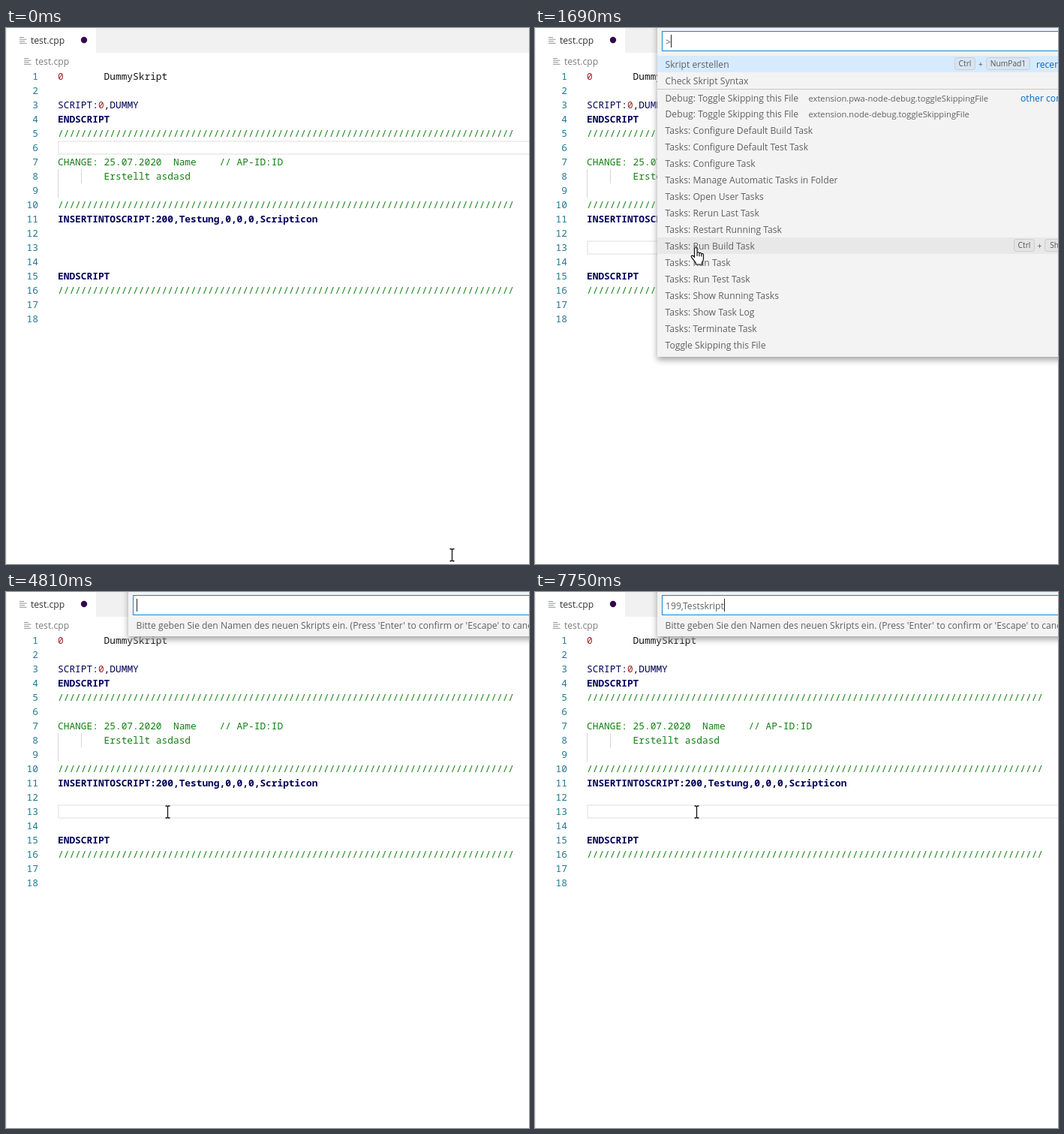
An HTML page for the animation above (8 s loop, 697 px wide and 714 px high).

```html
<!DOCTYPE html>
<html lang="de">
<head>
<meta charset="utf-8">
<title>Editor</title>
<style>
  html, body { margin: 0; width: 100%; height: 100%; overflow: hidden; background: #fff; }
  svg { display: block; width: 697px; height: 714px; }
  text { white-space: pre; font: 12.17px "Open Sans", sans-serif; fill: #616161; }
  .code text { font: 12.83px "Noto Sans Mono", monospace; }
  .code .b { font-weight: 700; }
  .num { fill: #237893; text-anchor: end; }
  .hit { fill: #0060b4; font-weight: 700; }
  .note { fill: #0066bf; }
  text.small { font-size: 11.2px; }
  text.key { font-size: 10.2px; fill: #555; text-anchor: middle; }
  .panel { fill: #f3f3f3; filter: drop-shadow(0 4px 4px #a0a0a0); }
</style>
</head>
<body>
<svg viewBox="0 0 697 714">
  <rect width="697" height="714" fill="#fff"/>
  <rect width="1" height="714" fill="#ebebeb"/>
  <rect x="120" width="577" height="33" fill="#f1f1f1"/>
  <g id="tabs"></g>
  <g id="guides" fill="#d6d6d6"></g>
  <rect id="active" x="70" width="640" height="17" fill="none" stroke="#eee" stroke-width="2"/>
  <g id="code" class="code"></g>
  <rect id="editCaret" x="99.5" y="283" width="1.5" height="19" fill="#111"/>
  <g id="palette"></g>
  <g id="beam" fill="none">
    <path d="M-3 -8H-1L0 -7L1 -8H3M0 -7V7M-3 8H-1L0 7L1 8H3" stroke="#fff" stroke-width="3"/>
    <path d="M-3 -8H-1L0 -7L1 -8H3M0 -7V7M-3 8H-1L0 7L1 8H3" stroke="#111" stroke-width="1.3"/>
  </g>
  <path id="hand" fill="#fff" stroke="#111" stroke-width="1.2" stroke-linejoin="round"
    d="M212.5 306V294.3Q212.5 292.5 214.3 292.5T216.1 294.3V299.4Q217.8 297.8 219 300Q220.8 298.6 221.8 300.8Q224.5 300 224.5 302.6V307.5Q224.5 310 222.6 312V315H214.3V312.8L208.6 305.4Q207.6 303.6 209.3 303.2Q210.8 303 212.5 305M216.1 299.4V304M219 300V304.2M221.8 300.8V304.6"/>
</svg>
<script>
const LOOP = 8000;
const $ = id => document.getElementById(id);
const esc = s => s.replace(/&/g, "&amp;").replace(/</g, "&lt;").replace(/>/g, "&gt;");
const text = (x, y, s, attrs = "") => `<text x="${x}" y="${y}" ${attrs}>${s}</text>`;
const rect = (x, y, w, h, attrs) => `<rect x="${x}" y="${y}" width="${w}" height="${h}" ${attrs}/>`;
const show = (el, on) => el.setAttribute("display", on ? "inline" : "none");

// Editor content: colour and text runs per line
const NAVY = "#000058", RED = "#a02020", GREEN = "#128012";
const rule = [[GREEN, "/".repeat(79)]];
const end = [[NAVY, "ENDSCRIPT", "b"]];
const lines = [
  [[RED, "0"], ["#111", "       DummySkript"]],
  [],
  [[NAVY, "SCRIPT:"], [RED, "0"], [NAVY, ",DUMMY"]],
  end,
  rule,
  [],
  [[GREEN, "CHANGE: 25.07.2020  Name    // AP-ID:ID"]],
  [[GREEN, "        Erstellt asdasd"]],
  [],
  rule,
  [[NAVY, "INSERTINTOSCRIPT:200,Testung,0,0,0,Scripticon", "b"]],
  [], [], [],
  end,
  rule,
  [], []
];
const lineTop = n => 55 + 19 * (n - 1);

$("code").innerHTML = lines.map((runs, i) => {
  const y = lineTop(i + 1) + 14;
  const spans = runs.map(([fill, s, cls = ""]) => `<tspan fill="${fill}" class="${cls}">${s}</tspan>`).join("");
  return text(43, y, i + 1, 'class="num"') + text(69, y, spans);
}).join("");

$("guides").innerHTML = [[69, 8], [100, 8], [69, 9]]
  .map(([x, n]) => rect(x, lineTop(n), 1, 19, "")).join("");

const fileIcon = (x, y) => [6, 9.5, 7, 9.5]
  .map((w, i) => rect(x, y + i * 2.6, w, 1.1, 'fill="#9a9fa3"')).join("");
$("tabs").innerHTML = fileIcon(18, 12) + text(33, 21, "test.cpp", 'style="fill:#333"') +
  '<circle cx="104" cy="16" r="4.2" fill="#34084f"/>' +
  fileIcon(24, 40) + text(39, 49, "test.cpp", 'style="fill:#7c7c7c"');

// Command palette
const commands = [
  "Skript erstellen", "Check Skript Syntax",
  "Debug: Toggle Skipping this File", "Debug: Toggle Skipping this File",
  ...["Configure Default Build Task", "Configure Default Test Task", "Configure Task",
    "Manage Automatic Tasks in Folder", "Open User Tasks", "Rerun Last Task",
    "Restart Running Task", "Run Build Task", "Run Task", "Run Test Task",
    "Show Running Tasks", "Show Task Log", "Terminate Task"].map(s => "Tasks: " + s),
  "Toggle Skipping this File"
];
const details = { 2: "extension.pwa-node-debug.toggleSkippingFile", 3: "extension.node-debug.toggleSkippingFile" };
const PROMPT = "Bitte geben Sie den Namen des neuen Skripts ein. (Press 'Enter' to confirm or 'Escape' to cancel)";
const ERROR = "Hookname muss Pattern ^[0-9]+,[a-zA-ZöäüÖÄÜ_ ]+$ entsprechen";

function mark(label, query) {
  const at = label.toLowerCase().indexOf("sk"), to = at + query.length;
  return `${label.slice(0, at)}<tspan class="hit">${label.slice(at, to)}</tspan>${label.slice(to)}`;
}

function key(x, y, w, label) {
  return rect(x + .5, y + .5, w - 1, 16, 'rx="3" fill="#ddd" fill-opacity=".4" stroke="#bbb" stroke-opacity=".55"') +
    text(x + w / 2, y + 12, label, 'class="key"');
}

function listRows(query) {
  const rows = query.length > 2 ? commands.slice(0, 2) : commands;
  let out = rect(163, 37, 534, 22, 'fill="#d6ebff"');
  if (rows.length > 2) {
    out += rect(163, 81, 534, 1, 'fill="#cacaca"') + rect(163, 279, 534, 22, 'fill="#e8e8e8"');
  }
  rows.forEach((label, i) => {
    const y = 53 + 22 * i + (i === 2 ? 1 : 0);
    out += text(173.5, y, mark(label, query));
    if (details[i]) out += text(364.5, y, details[i], 'class="small"');
  });
  out += key(559, 39, 28, "Ctrl") + text(594, 52, "+", 'class="key"') +
    key(601, 39, 59, "NumPad1") + text(668, 53, "recently used", 'class="note"');
  if (rows.length > 2) {
    out += text(647, 98, "other commands", 'class="note"') +
      key(638, 281, 28, "Ctrl") + text(672.5, 294, "+", 'class="key"') + key(679, 281, 36, "Shift");
  }
  return out;
}

function palette({ mode, value, caret }) {
  if (!mode) return "";
  const bad = mode === "error";
  const query = value.slice(1);
  const bottom = mode === "list" ? (query.length > 2 ? 87 : 438) : bad ? 63 : 59;
  const edge = bad ? "#be1100" : "#0a8bd8";
  let out = rect(163, -20, 560, bottom + 20, 'class="panel"');
  if (mode === "list") out += listRows(query);
  else if (bad) out += rect(169.5, 31.5, 560, 27, `fill="#f2dede" stroke="${edge}"`) + text(174.5, 50, ERROR);
  else out += text(173.5, 49, PROMPT);
  out += rect(169.5, 4.5, 560, 26, `fill="#fff" stroke="${edge}"`) + text(174, 23, esc(value), 'id="typed"');
  if (caret) out += rect(174, 9, 1, 17, 'id="caret" fill="#222"');
  return out;
}

// Start time, mode, typed value, caret visible
const states = [
  [0, "", "", 0],
  [1690, "list", ">", 1], [2140, "list", ">s", 1], [2220, "list", ">sk", 1],
  [2390, "list", ">skr", 1], [2540, "list", ">skri", 1], [2710, "list", ">skrip", 1], [3270, "list", ">skrip", 0],
  [3760, "ask", "", 1], [4340, "ask", "", 0], [4810, "ask", "", 1],
  [5300, "ask", "1", 1], [5360, "ask", "19", 1],
  [5520, "error", "199", 1], [5910, "error", "199,", 1], [6390, "error", "199,", 0],
  [6470, "error", "199,T", 1], [6550, "error", "199,Te", 1],
  [6640, "error", "199,Tes", 1], [6720, "error", "199,Test", 1], [6800, "ask", "199,Test", 1],
  [7270, "ask", "199,Tests", 1], [7360, "ask", "199,Testsk", 1],
  [7500, "ask", "199,Testskr", 1], [7580, "ask", "199,Testskri", 1],
  [7670, "ask", "199,Testskrip", 1], [7750, "ask", "199,Testskript", 1]
];

let shown = null;
function drawPalette(t) {
  const state = states.findLast(s => s[0] <= t);
  if (state === shown) return;
  shown = state;
  const [, mode, value, caret] = state;
  $("palette").innerHTML = palette({ mode, value, caret });
  if (mode && caret && value) {
    $("caret").setAttribute("x", Math.round(174 + $("typed").getComputedTextLength()));
  }
}

function drawPointer(t) {
  const hand = t >= 1610 && t < 2390;
  show($("hand"), hand);
  show($("beam"), !hand);
  const step = t < 70 ? 0 : Math.min(6, 1 + Math.floor((t - 70) / 72));
  const u = step / 6, e = u * u * (3 - 2 * u);
  const x = Math.round(594 - 379 * e) + .5, y = Math.round(702 - 409 * e);
  $("beam").setAttribute("transform", `translate(${x} ${y})`);
}

function draw(t) {
  $("active").setAttribute("y", lineTop(t < 620 ? 6 : 13) + 1);
  show($("editCaret"), t >= 670 && t < 1150);
  drawPalette(t);
  drawPointer(t);
}

const start = performance.now();
function tick() {
  draw((performance.now() - start) % LOOP);
  requestAnimationFrame(tick);
}
draw(0);
requestAnimationFrame(tick);
</script>
</body>
</html>
```
